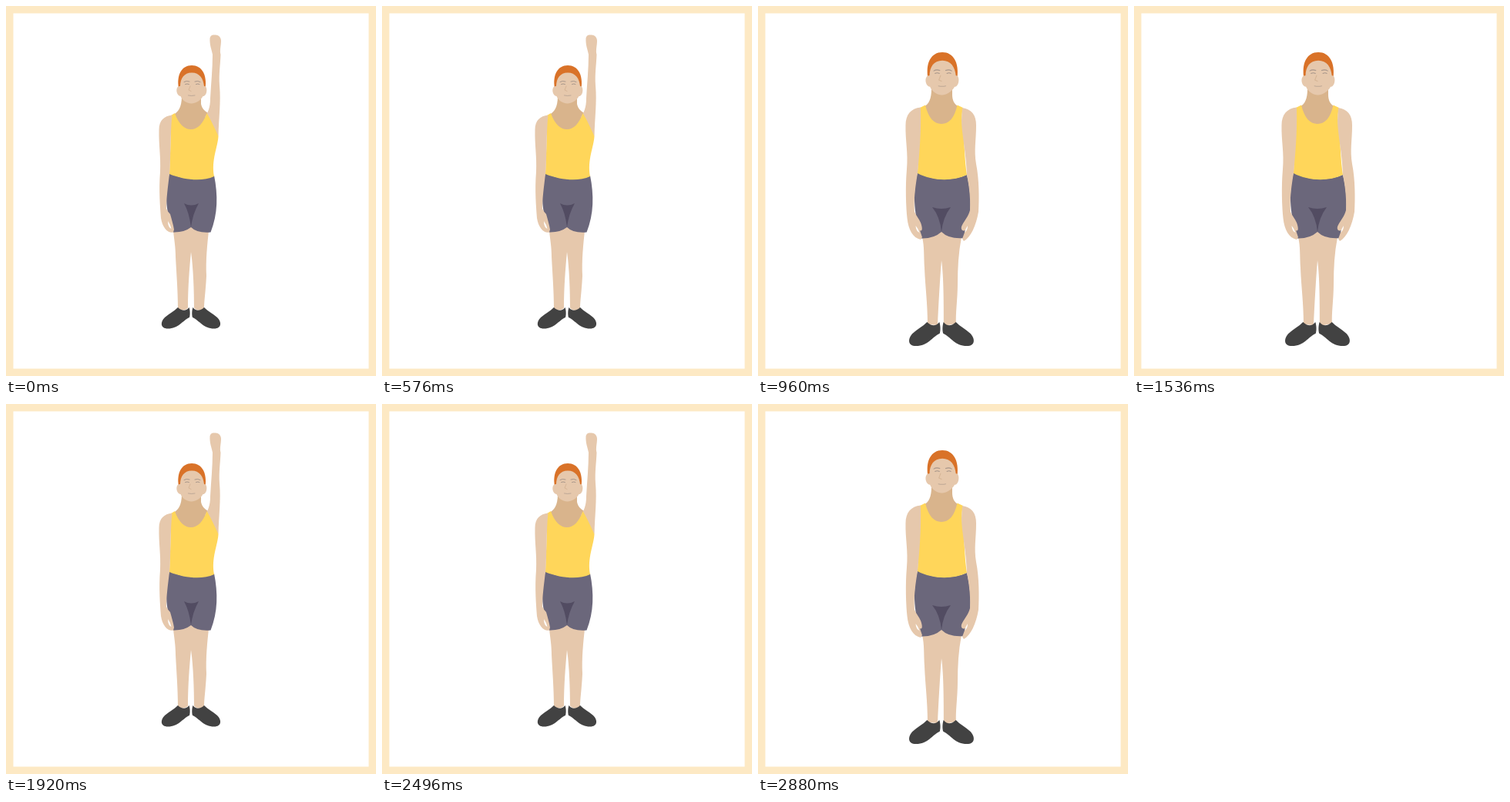
Write an HTML page that moves like this. It is 480 px wide and 480 px high and loops after 3.84 s.

```html
<!DOCTYPE html>
<html lang="en">
<head>
<meta charset="utf-8">
<title>Arm raise</title>
<style>
  html, body { margin: 0; height: 100%; overflow: hidden; background: #fde9c4; }
  svg { display: block; width: 100vw; height: 100vh; }
  .skin { fill: #e6c8ac; }
  .neck { fill: #d9b48c; }
  .hair { fill: #d97228; }
  .shirt { fill: #ffd65a; }
  .shorts { fill: #6b677b; }
  .fold { fill: #524c62; }
  .shoe { fill: #424242; }
  .gap { fill: #fff; }
  .line { fill: none; stroke: #a8968a; stroke-width: 1; stroke-linecap: round; }
  .soft { fill: none; stroke: #d6b596; stroke-width: 1; stroke-linecap: round; }
</style>
</head>
<body>
<svg viewBox="0 0 480 480">
  <defs>
    <g id="head">
      <path class="hair" d="M224 107C221 89 228 77 241 77C254 77 261 89 258.500 107Z"/>
      <path class="skin" d="M226 104C226 94 231 86.500 241 86.500C251 86.500 256 94 257 104C262 103 261.500 117 255.500 117C252 123 246 126.500 240.500 126.500C235 126.500 229 123 226.500 117C220 116 219.500 103 226 104Z"/>
      <path class="line" d="M231 98.500Q234 96.500 238 98M245 98Q249 96.500 252 98.500M232.500 101.500Q235 100.300 237.500 101.500M246.500 101.500Q249 100.300 251 101.500"/>
      <path class="soft" d="M239 104L237 109L240 110.500"/>
      <path class="line" stroke-opacity=".65" d="M236.500 116Q240.500 117 245 116"/>
    </g>
    <path id="shoe" class="shoe" d="M223 391C228 396 234 396 237.500 391C239 395 239 401 238 404C229 408 224 418.500 210 418.500C200 418.500 200 410 206 404C212 399 218 396 223 391Z"/>
    <g id="shoes">
      <use href="#shoe"/>
      <use href="#shoe" transform="matrix(-1 0 0 1 480 0)"/>
    </g>
  </defs>

  <rect x="9.500" y="9.500" width="461" height="461" fill="#fff"/>

  <g id="raised">
    <path class="skin" d="M217 292Q232 293 240 286Q252 295 263 292C261 310 259 330 260 350C259 370 257 383 257 392Q251 398 244 392C244 370 243 340 240 319C238 340 236 365 236 392Q229 397 223 392C223 370 221 345 220 325C220 312 218 302 217 292Z"/>
    <use href="#shoes"/>
    <path class="neck" d="M228 117H253V127C254 133 258 136 262 139L252 165H228L217 141C223 138 228 132 228 117Z"/>
    <path class="skin" d="M268 63C267 57 264 51 264.500 42C265 38 268 37 271 37.500C275 37 279 40 279 45C279 52 277 57 278.500 63C278 76 276 88 277 103C279 125 276 145 275.500 169L258 144C262 138 265 132 265 120C266 100 268 82 268 63Z"/>
    <path class="shorts" d="M212 217C232 226 255 227 270 220C275 245 275 270 265.500 293.500Q248 295 240 287Q231 294 217 293.500C206 262 206 240 212 217Z"/>
    <path class="fold" d="M231 256Q240 261 250 256Q242 270 240 287Q238 269 231 256Z"/>
    <path class="shirt" d="M214 142L219 139C224 153 231 160 240 160C249 160 256 152 260.500 139C266 148 271 159 275.500 169C275 182 266 200 270 221C255 228 232 226 212 218C213 195 214 165 214 142Z"/>
    <path class="skin" d="M215.500 141.500C205 143 198.500 148 198.500 161C198 180 201 195 200 215C198 240 200 260 201 275C203 288 210 295 217 293.500L218 290C217 284 215 277 213 270Q210 267 208 263C208 250 210 235 212 218C214 195 213 165 215.500 141.500Z"/>
    <path class="gap" d="M210 279Q213 283 214.500 289Q210 287 210 279Z"/>
    <use href="#head"/>
  </g>

  <g id="lowered">
    <path class="skin" d="M213 300Q228 301 238 292Q250 303 264 300C260 320 259 340 259 360C259 380 256 400 257 412L241 415C241 390 241 350 238 330C236 355 234 390 233 414L220 413C220 385 217 365 216 340C215 325 216 312 213 300Z"/>
    <use href="#shoes" transform="matrix(1.1 0 0 1.130 -26 -31.800)"/>
    <path class="neck" d="M225 108H252V115C252 123 255 127 259 130L252 156H225L215 131C222 127 225 120 225 108Z"/>
    <path class="shorts" d="M207 216C226 227 252 227 271 219C276 240 277 260 274 275L268 301Q248 303 238 293Q228 302 212 301.500C201 265 201 240 207 216Z"/>
    <path class="fold" d="M226 261Q238 265 250 261Q240 274 238 293Q236 273 226 261Z"/>
    <path class="shirt" d="M210 132L217 128.500C221 145 228 153 238 153C248 153 255 145 258.500 128.500L266 132C264 140 264 150 266 160C268 180 268 200 271 219C252 228 226 227 207 217C208 195 211 160 210 132Z"/>
    <path class="skin" d="M211 131.500C198 133 191.500 141 191.500 155C191 175 195 190 193 212C191 235 192 260 193.500 275C195 290 201 301 211 303L213 300L210 291C213 293 214 289 211 281C209 276 205 272 203 267C202 250 204 235 207 217C209 195 212 165 211 131.500Z"/>
    <path class="gap" d="M204.500 285Q208 289 209.500 294Q205 292 204.500 285Z"/>
    <path class="skin" d="M265 132C277 134 283 141 283 155C283 175 280 186 283 205C287 225 287 250 286 267C283 285 276 300 267 305L265 302L269 291C265 293 262 289 265 284C268 278 273 273 275 265C276 245 273 230 271 219C270 190 264 165 264 148Z"/>
    <path class="gap" d="M272 285Q269 289 268 294Q272 291 272 285Z"/>
    <use href="#head" transform="matrix(1.100 0 0 1.120 -26 -26.200)"/>
  </g>
</svg>
<script>
  const HOLD = 960;
  const poses = ["raised", "lowered"].map(id => document.getElementById(id));

  function draw(time) {
    const current = Math.floor(time / HOLD) % poses.length;
    poses.forEach((pose, i) => pose.style.display = i === current ? "" : "none");
  }

  const start = performance.now();
  function tick() {
    draw(performance.now() - start);
    requestAnimationFrame(tick);
  }
  tick();
</script>
</body>
</html>
```
